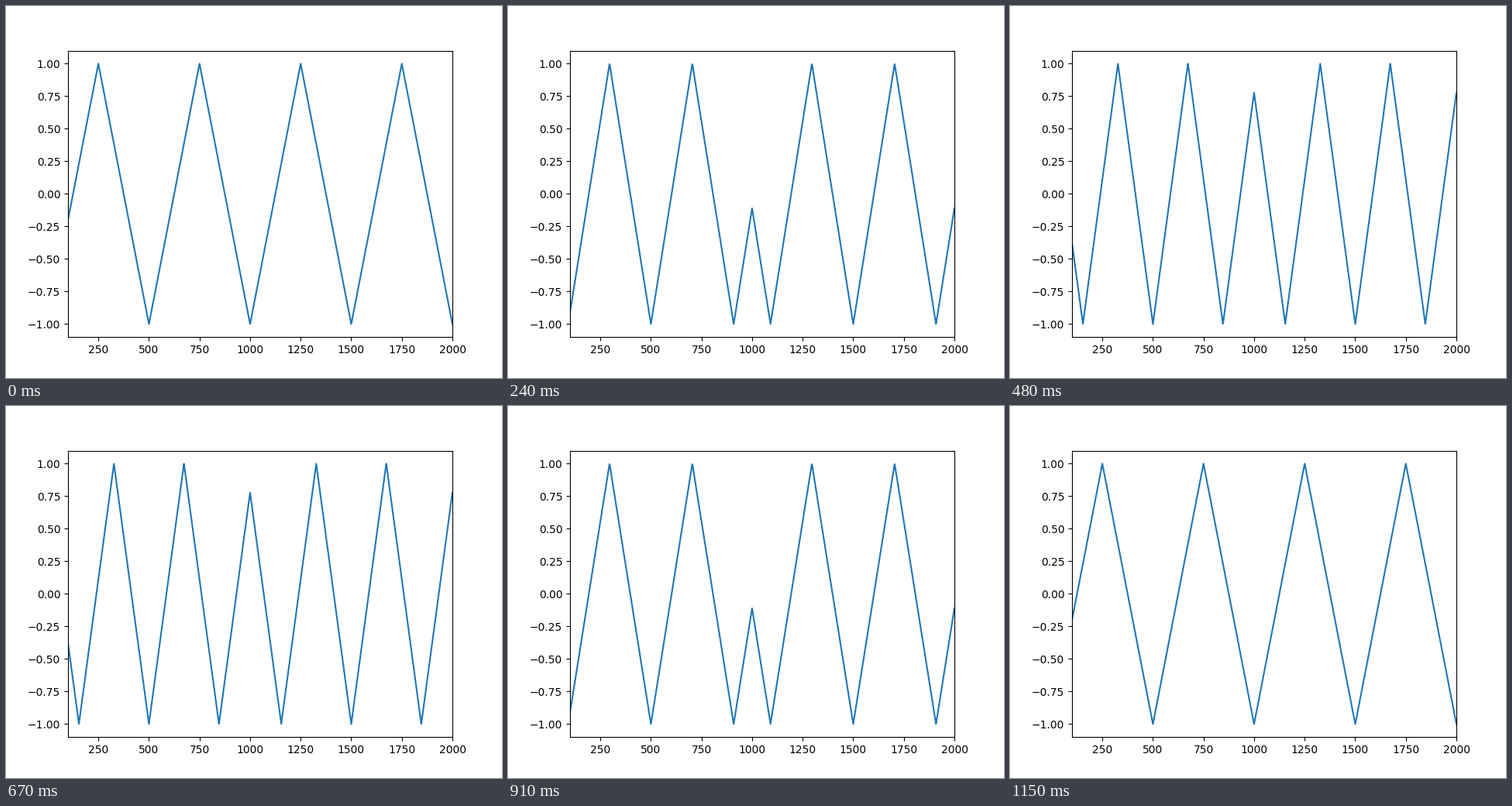
Recreate the animation shown at these times as a matplotlib script. Size 640x480 px, loop 1.21 s.

```python
import numpy as np
import matplotlib.pyplot as plt
from matplotlib.animation import FuncAnimation

TICK = 10        # ms per frame
LOOP = 1210      # ms per loop
STEP = 60        # ms per frequency step
TOP = 9          # highest step, held from RISE_END to FALL_START
RISE_END, FALL_START = 540, 670

x = np.arange(100, 2001)
dist = np.abs(x % 1000 - 500)


def step_at(t):
    """Frequency step at time t: up, hold, back down."""
    if t < RISE_END:
        return t // STEP
    if t < FALL_START:
        return TOP
    return TOP - 1 - (t - FALL_START) // STEP


def wave(step):
    """Triangle wave mirrored about every odd multiple of 500."""
    half_period = 250 / (1 + step / 18)
    phase = dist / half_period % 2
    return 1 - 2 * np.abs(phase - 1)


fig, ax = plt.subplots(figsize=(6.4, 4.8), dpi=100)
ax.set_xlim(100, 2000)
ax.set_ylim(-1.1, 1.1)
line, = ax.plot(x, wave(0))


def update(i):
    line.set_ydata(wave(step_at(i * TICK)))
    return line,


anim = FuncAnimation(fig, update, frames=LOOP // TICK, interval=TICK,
                     repeat=True, repeat_delay=0)
plt.show()
```
